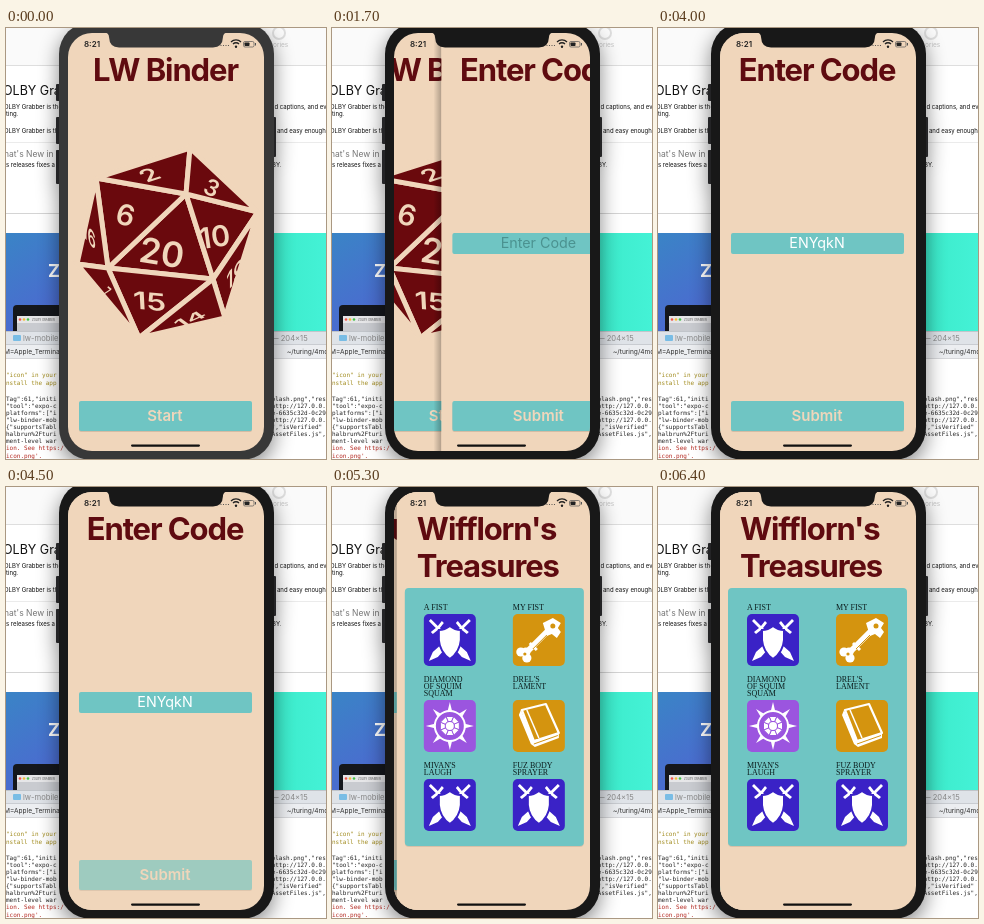
Recreate the animation shown at these times as an HTML page. Size 320x431 px, loop 6500 ms.

```html
<!DOCTYPE html>
<html lang="en">
<head>
<meta charset="utf-8">
<title>Phone app demo</title>
<style>
  html, body { margin: 0; width: 100%; height: 100%; overflow: hidden; background: #fff; }
  svg { display: block; width: 320px; height: 431px; }
  text { font-family: Inter, "Open Sans", sans-serif; white-space: pre; }
  .title { font-size: 31px; font-weight: 700; letter-spacing: -1.1px; fill: #5f0b10; }
  .mid { text-anchor: middle; }
  .label { font-size: 15px; font-weight: 600; fill: #f0d6bb; }
  .field { font-size: 14.3px; }
  .item { font: 8px "Liberation Serif", "Noto Serif", serif; fill: #0c1c1c; }
  .mono { font: 6px "DejaVu Sans Mono", "Liberation Mono", monospace; }
  .die text { font-weight: 600; fill: #f0d6bb; text-anchor: middle; }
</style>
</head>
<body>
<svg id="stage" viewBox="0 0 320 431"></svg>
<script>
const W = 196, LEFT = 62, LOOP = 6500;
const BEIGE = '#f0d6bb', TEAL = '#6fc5c3', MAROON = '#6a090d';

const rect = (x, y, w, h, fill, r = 0, more = '') =>
  `<rect x="${x}" y="${y}" width="${w}" height="${h}" rx="${r}" fill="${fill}" ${more}/>`;
const text = (x, y, s, attrs = '') => `<text x="${x}" y="${y}" ${attrs}>${s}</text>`;
const path = (d, attrs = '') => `<path d="${d}" ${attrs}/>`;
const dot = (x, y, r, fill) => `<circle cx="${x}" cy="${y}" r="${r}" fill="${fill}"/>`;
const size = (px, fill = '#111') => `font-size="${px}" fill="${fill}"`;

// Desktop behind the phone
function desktop() {
  const olive = '#a08a1c', red = '#b3261e', ink = '#222';
  const lines = [
    [349, '"icon" in your', '', olive], [356.5, 'nstall the app', '', olive],
    [372.5, 'Tag":61,"initi', 'splash.png","reso', ink],
    [379.5, '"tool":"expo-c', ' http://127.0.0.1', ink],
    [386.7, 'platforms":["i', 'le-6635c32d-0c29', ink],
    [394, '"lw-binder-mob', ' http://127.0.0.1', ink],
    [401, '{"supportsTabl', 'e","isVerified"', ink],
    [408, 'halbrun%2Fturi', '/AssetFiles.js",', ink],
    [415, 'ment-level war', '', ink], [422, 'ion. See https:/', '', red], [429.5, "icon.png'.", '', red]
  ];
  return rect(0, 0, 320, 431, '#fff') + rect(0, 0, 320, 37, '#fafafa') + rect(0, 37, 320, 1, '#dedede') +
    '<circle cx="273" cy="5" r="6" fill="none" stroke="#ddd" stroke-width="2"/>' +
    text(263, 19, 'gories', size(6.5, '#c4c4c4')) +
    text(-3, 66.5, 'OLBY Grabber', size(12.5)) +
    text(-2, 81, 'OLBY Grabber is the', size(6)) + text(267, 81, 'ld captions, and even', size(6)) +
    text(0, 88, 'ting.', size(6)) +
    text(-2, 105, 'OLBY Grabber is the', size(6)) + text(271, 105, 'and easy enough', size(6)) +
    rect(0, 114, 320, .7, '#e2e2e2') +
    text(-2, 129, "hat's New in V", size(8.5, '#777')) +
    text(0, 139, 's releases fixes a', size(6)) + text(266, 139, 'BY.', size(6)) +
    rect(0, 185, 320, 1, '#d4d4d4') +
    rect(0, 205, 160, 99, 'url(#blue)') + rect(160, 205, 160, 99, 'url(#mint)') +
    text(42, 249, 'Z', 'font-size="18" font-weight="700" fill="#fff"') +
    rect(7, 277, 60, 40, '#15171c', 4) + rect(11, 288, 50, 20, '#c9cbd0') + rect(11, 288, 50, 7, '#e6e6e8') +
    ['#f2564d', '#f4bd3a', '#46c24b'].map((c, i) => dot(14 + i * 4, 291.5, 1.3, c)).join('') +
    text(26, 293, 'ZOLBY GRABBER', size(2.8, '#555')) +
    rect(0, 303, 320, 128, '#fff') + rect(0, 303, 320, 13, '#dfe3e8') + rect(0, 316, 320, 14, '#eceef1') +
    rect(0, 303, 320, .7, '#b5b9be') + rect(0, 316, 320, .7, '#bbbec4') + rect(0, 330, 320, .7, '#c4c6ca') +
    rect(7, 307, 8, 6, '#79bde5', 1) +
    text(17, 313, 'lw-mobile', size(7.6, '#888')) + text(265, 313, '— 204×15', size(7.6, '#888')) +
    text(-2, 325.5, 'M=Apple_Terminal', size(6.6, '#333')) + text(281, 325.5, '~/turing/4mod', size(6.6, '#333')) +
    lines.map(([y, a, b, c]) => text(0, y, a, `class="mono" fill="${c}"`) +
      text(262, y, b, `class="mono" fill="${c}"`)).join('');
}

// Twenty-sided die from its nine visible corners
function die() {
  const v = {
    T: [184, 120], L: [90, 150], R: [252, 184], A: [180, 166], B: [102, 240],
    C: [207, 251], K: [71, 236], E: [219, 290], Z: [133, 310]
  };
  const faces = ['ABC', 'LAB', 'ARC', 'BCZ', 'LTA', 'TRA', 'LBK', 'KBZ', 'RCE', 'CEZ'];
  const nums = [
    ['20', 154, 237, 35, 'rotate(9)'], ['6', 117, 197, 29, 'rotate(14)'],
    ['10', 210, 219, 29, 'rotate(-8)'], ['15', 144, 282, 29, 'rotate(5) skewX(8) scale(1.1 .83)'],
    ['2', 149, 152, 25, 'rotate(-18) skewX(28) scale(1.1 .75)'], ['3', 202, 167, 23, 'rotate(27)'],
    ['16', 83, 215, 25, 'skewY(50) scale(.52 .9)'], ['19', 229, 255, 26, 'skewY(-46) scale(.64 .95)'],
    ['14', 188, 294, 24, 'rotate(-24) skewX(30) scale(1.2 .5)'], ['7', 97, 268, 15, 'rotate(40) scale(.6 1)']
  ];
  return '<g class="die">' + faces.map(f =>
    `<polygon points="${[...f].map(k => v[k]).join(' ')}" fill="${MAROON}" stroke="${BEIGE}" stroke-width="5"/>`).join('') +
    nums.map(([s, x, y, px, tf]) =>
      `<text font-size="${px}" transform="translate(${x} ${y}) ${tf}">${s}</text>`).join('') + '</g>';
}

// Item icons on 52 x 52 tiles
const sword = path('M5 7L7 5L14 12L18 7L20 9L16 14L43 38L47 47L38 43L14 16L9 20L7 18L12 14Z', 'fill="#fff"');
const spin = (n, s) => Array.from({ length: n }, (_, i) => `<g transform="rotate(${i * 360 / n} 26 26)">${s}</g>`).join('');
const icons = {
  shield: ['#3a22c6', c => sword + `<g transform="matrix(-1 0 0 1 52 0)">${sword}</g>` +
    path('M26 12Q21 16 15 16V26Q16 38 26 45Q36 38 37 26V16Q31 16 26 12Z', `fill="#fff" stroke="${c}" stroke-width="2"`)],
  key: ['#d4940f', c => path('M13 39L40 12', 'stroke="#fff" stroke-width="6"') +
    path('M30 9L40 4L48 9L45 14L48 18L44 24L39 20L34 22Z', 'fill="#fff"') + dot(40, 12, 2.5, c) +
    path('M17 29L24 36', 'stroke="#fff" stroke-width="3"') +
    [[8, 38], [14, 44], [13, 38]].map(([x, y]) => dot(x, y, 4.6, '#fff')).join('') + dot(12, 40, 1.6, c) +
    path('M20 35L34 21', `stroke="${c}" stroke-width="1"`)],
  gem: ['#9b55df', c => spin(8, path('M23.8 11L26 2L28.2 11Z', 'fill="#fff"')) +
    '<circle cx="26" cy="26" r="15" fill="none" stroke="#fff" stroke-width="2"/>' +
    spin(8, path('M22 16.5H30L28 21.5H24Z', `fill="#fff" stroke="${c}"`)) + dot(26, 26, 4, '#fff')],
  book: ['#d4940f', c => path('M8 10L21 41L46 33V38L22 47L18 44L6 15Z', 'fill="#fff"') +
    path('M9 10L33 4L46 33L21 41Z', `fill="${c}" stroke="#fff" stroke-width="2.2" stroke-linejoin="round"`) +
    path('M13 10L25 39M21 44L45 35.500', `stroke="${c}" stroke-width="1"`) +
    path('M14 10L26 38', 'stroke="#fff" stroke-width="1.5"')]
};
const items = [
  ['shield', 'A FIST'], ['key', 'MY FIST'],
  ['gem', 'DIAMOND', 'OF SQUIM', 'SQUAM'], ['book', "DREL'S", 'LAMENT'],
  ['shield', "MIVAN'S", 'LAUGH'], ['shield', 'FUZ BODY', 'SPRAYER']
];
function item([kind, ...words], i) {
  const x = i % 2 ? 178 : 89, row = i >> 1, [color, draw] = icons[kind];
  return words.map((s, k) => text(x, [123, 195, 281][row] + k * 7, s, 'class="item"')).join('') +
    `<g transform="translate(${x} ${[127, 213, 292][row]})">${rect(0, 0, 52, 52, color, 5)}${draw(color)}</g>`;
}

const button = (id, s) => `<g id="${id}">` + rect(73, 374, 173, 30, '#000', 2, 'opacity=".12"') +
  rect(73, 373, 173, 30, TEAL, 2) + text(159, 393, s, 'class="label mid"') + '</g>';
const page = (id, body) => `<g id="${id}">` + rect(54, 0, 8, 431, 'url(#edge)') +
  rect(LEFT, 0, W, 431, BEIGE) + body + '</g>';

const wifi = [5, 3].map(r => path(`M${230 - r} ${19 - r}A${r * 1.4} ${r * 1.4} 0 0 1 ${230 + r} ${19 - r}`,
  'fill="none" stroke="#222" stroke-width="1.3"')).join('') + dot(230, 18.7, 1.2, '#222');
const statusBar = text(78, 19.3, '8:21', 'font-size="8" font-weight="600" fill="#222"') +
  [215, 217.5, 220, 222.5].map(x => dot(x, 17.5, .6, '#444')).join('') + wifi +
  rect(237.5, 13.5, 10.5, 5.5, 'none', 1.5, 'stroke="#555" stroke-width=".7"') +
  rect(238.5, 14.5, 5, 3.5, '#222', .7) + rect(249, 15, 1, 2.5, '#555');

const grad = (id, a, b, more = '') => `<linearGradient id="${id}" ${more}><stop stop-color="${a}"/><stop offset="1" stop-color="${b}"/></linearGradient>`;
const stage = document.getElementById('stage');
stage.innerHTML = `<defs>
  ${grad('blue', '#3a84c6', '#5a55d8', 'x2="1" y2="1"')}${grad('mint', '#2cdcb4', '#44f2d6')}
  ${grad('edge', '#0000', '#0004')}
  <clipPath id="glass">${rect(LEFT, 5, W, 418, '#fff', 24)}</clipPath></defs>` +
  desktop() +
  '<g style="filter:drop-shadow(0 7px 10px #0007)">' +
  [[56, 17], [89, 27], [122, 34]].map(([y, h]) => rect(50, y, 5, h, '#242426', 1)).join('') +
  rect(266, 89, 4, 40, '#242426', 1) + rect(53, -6, 215, 438, 'currentColor', 32) + '</g>' +
  '<g clip-path="url(#glass)">' +
  page('home', text(159.5, 52.6, 'LW Binder', 'class="title mid"') + die() + button('start', 'Start')) +
  page('code', text(159, 52.6, 'Enter Code', 'class="title mid"') + rect(73, 205, 173, 21, TEAL, 2) +
    text(159, 220.4, '', 'id="entry" class="field mid"') + rect(0, 206.5, 1.2, 18, '#3f6fc0', 0, 'id="caret"') +
    button('submit', 'Submit')) +
  page('loot', text(82, 52.6, "Wifflorn's", 'class="title"') + text(82, 89.6, 'Treasures', 'class="title"') +
    rect(70, 102, 179, 258, '#000', 4, 'opacity=".1"') + rect(70, 101, 179, 258, TEAL, 4) + items.map(item).join('')) +
  statusBar + '</g>' +
  path('M98 4Q103 5 103 9Q103.500 19.500 113 19.500H207Q216.500 19.500 217 9Q217 5 222 4Z', 'fill="currentColor"') +
  rect(125, 416.5, 69, 2.2, '#111', 1.1);

const el = Object.fromEntries([...stage.querySelectorAll('[id]')].map(e => [e.id, e]));
const clamp = x => Math.min(1, Math.max(0, x));

// cubic-bezier(.2833, .99, .3183, .99)
function ease(x) {
  if (x <= 0 || x >= 1) return clamp(x);
  const curve = (a, b, u) => 3 * (1 - u) ** 2 * u * a + 3 * (1 - u) * u * u * b + u ** 3;
  let lo = 0, hi = 1;
  for (let i = 0; i < 30; i++) {
    const u = (lo + hi) / 2;
    if (curve(.2833, .3183, u) < x) lo = u; else hi = u;
  }
  return curve(.99, .99, lo);
}
const push = (t, start) => ease((t - start) / 330);
const press = (t, start) => 1 - .6 * (clamp((t - start) / 150) - clamp((t - start - 200) / 250));
function shift(e, x) {
  e.setAttribute('transform', `translate(${x.toFixed(2)} 0)`);
  e.setAttribute('visibility', x < W ? 'visible' : 'hidden');
}

const CODE = 'ENYqkN', KEYS = [3000, 3100, 3300, 3700, 3800, 3900];

function draw(now) {
  const t = Math.floor(now % LOOP / 100) * 100; // the picture steps ten times a second
  const p = push(t, 1612), q = push(t, 5087);
  shift(el.home, -.3 * W * p);
  shift(el.code, W * (1 - p) - .3 * W * q);
  shift(el.loot, W * (1 - q));
  el.start.setAttribute('opacity', press(t, 1200));
  el.submit.setAttribute('opacity', press(t, 4200));

  // the case darkens as its window gains focus
  const shade = 56 - 32 * clamp(t / 600);
  stage.style.color = `rgb(${shade}, ${shade}, ${shade})`;

  const typed = CODE.slice(0, KEYS.filter(k => t >= k).length);
  el.entry.textContent = typed || 'Enter Code';
  el.entry.setAttribute('fill', typed ? '#fff' : '#4b9290');
  const half = el.entry.getComputedTextLength() / 2;
  el.caret.setAttribute('x', 159 + (typed ? half + 1 : -half - .5));
  el.caret.setAttribute('opacity', t >= 2700 && t < 4000 ? 1 : 0);
  requestAnimationFrame(draw);
}
draw(performance.now());
</script>
</body>
</html>
```
